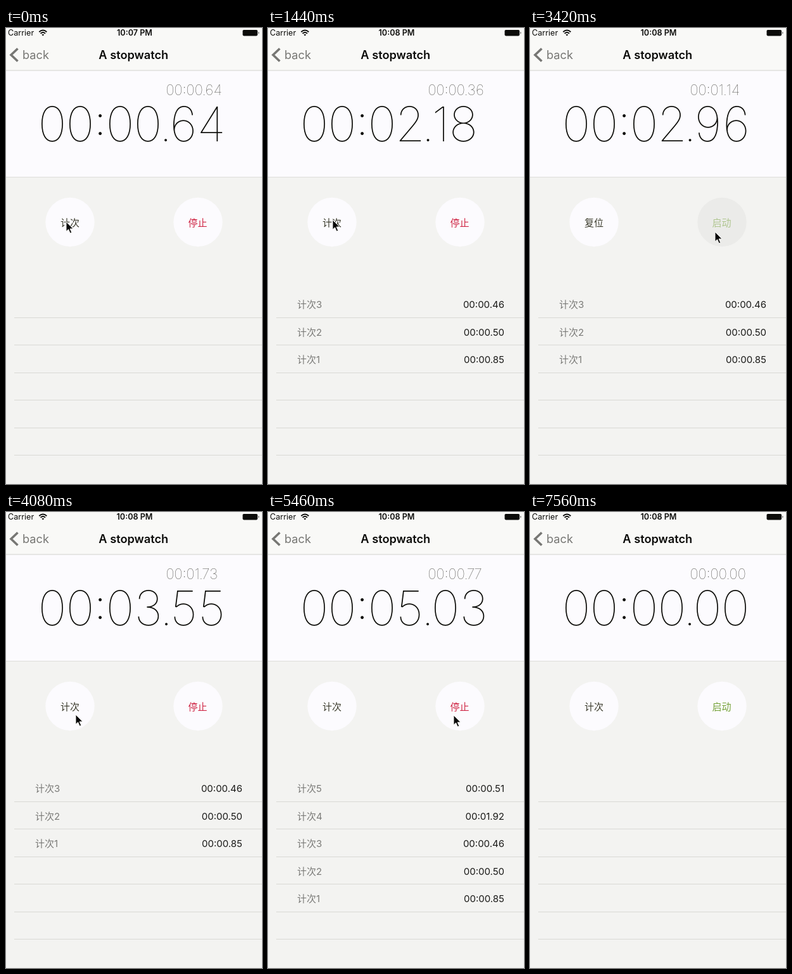
These frames come from a looping animation (404x720 px, 7620 ms). An HTML page:

```html
<!DOCTYPE html>
<html lang="en">
<head>
<meta charset="utf-8">
<title>A stopwatch</title>
<style>
  html, body { margin: 0; width: 100%; height: 100%; overflow: hidden; background: #f3f3f1; }
  svg { display: block; width: 404px; height: 720px; font-family: Inter, "Noto Sans CJK SC", "Noto Sans CJK", sans-serif; }
  .status { font-size: 12.6px; fill: #0c0c0a; }
  .bold { font-weight: 600; }
  .nav { font-size: 18.2px; }
  .thin { font-weight: 100; text-anchor: middle; }
  .button { font-size: 15px; text-anchor: middle; }
  .row { font-size: 15px; }
  .name { fill: #7b7b78; }
  .value { fill: #1a1a18; text-anchor: end; }
</style>
</head>
<body>
<svg viewBox="0 0 404 720">
  <rect width="404" height="720" fill="#f3f3f1"/>
  <rect width="404" height="67" fill="#f9f9f7"/>
  <rect y="67" width="404" height="168.5" fill="#fcfbfe"/>
  <path d="M0 67H404" stroke="#d2d2ce"/>
  <path d="M0 235.5H404" stroke="#dededa"/>

  <text class="status" x="3" y="12">Carrier</text>
  <g fill="none" stroke="#0c0c0a" stroke-width="1.9">
    <path d="M52.3 6.3Q58.3 .9 64.3 6.3M54.6 8.7Q58.3 5.4 62 8.7"/>
    <path d="M58.3 12.4L56.4 10.4Q58.3 8.9 60.2 10.4Z" fill="#0c0c0a" stroke="none"/>
  </g>
  <text id="clock" class="status bold" x="203" y="12" text-anchor="middle"></text>
  <rect x="373.5" y="3" width="23.5" height="9.4" rx="1.8" fill="#0c0c0a"/>
  <path d="M398.4 6Q400.4 7.7 398.4 9.4Z" fill="#0c0c0a"/>

  <path d="M18.5 32.5L8 42.5L18.5 52.5" fill="none" stroke="#777774" stroke-width="3.6"/>
  <text class="nav" x="26" y="49" fill="#777774">back</text>
  <text class="nav bold" x="201.3" y="49" text-anchor="middle" fill="#0c0c0a">A stopwatch</text>

  <text id="lap" class="thin" fill="#4c4c46"></text>
  <text id="total" class="thin" fill="#0c0c08"></text>

  <circle id="leftDisc" cx="101" cy="306.5" r="38.7"/>
  <text id="leftText" class="button" x="101" y="313"></text>
  <circle id="rightDisc" cx="303" cy="306.5" r="38.7"/>
  <text id="rightText" class="button" x="302.5" y="313"></text>

  <path id="lines" stroke="#d9d9d5"/>
  <g id="rows"></g>

  <path id="cursor" d="M0 0V15.2L3.6 11.9L6.2 18L8.7 16.9L6.1 11H11Z" fill="#080808" stroke="#fdfdfb" stroke-width=".9"/>
</svg>
<script>
const LOOP = 7620, STEP = 60;
const FIRST = 64, RATE = 0.10694;   // hundredths at the loop start and per ms
const STOP = 2169, RESUME = 3528, END = 5600, RESET = 6250;
const MINUTE_TURN = 720;

const ADVANCE = { 0: 44, 1: 28, 2: 44.5, 3: 45, 4: 44, 5: 44, 6: 44, 7: 38, 8: 44, 9: 45, ":": 19, ".": 12 };
const LAPS = [85, 50, 46, 192, 51];       // hundredths shown in the list
const MARKS = [85, 135, 182, 374, 426];   // running total at each lap

// time, x, y of the pointer tip
const POINTER = [
  [0, 95, 306], [1100, 95, 306], [1440, 102, 303], [2000, 292, 322], [3560, 292, 322],
  [4020, 110, 320], [4260, 110, 320], [4800, 107, 317], [4980, 107, 317],
  [5460, 293, 321], [5640, 293, 321], [6120, 97, 313], [6420, 97, 313], [6900, -20, 390]
];

const $ = id => document.getElementById(id);
const pad = n => String(n).padStart(2, "0");
const format = c => `${pad(Math.floor(c / 6000))}:${pad(Math.floor(c / 100) % 60)}.${pad(c % 100)}`;

function totalAt(t) {
  if (t >= RESET) return 0;
  const ran = Math.min(t, STOP) + Math.max(0, Math.min(t, END) - RESUME);
  return Math.round(FIRST + ran * RATE);
}

function timeOf(total) {
  const ran = (total - FIRST) / RATE;
  return ran <= STOP ? ran : ran + RESUME - STOP;
}

// A touch dims the button; after a lap the dimming lingers a moment.
const touched = (t, time, linger = 0) => t >= time - 110 && t < time + linger;
const LAP_TIMES = MARKS.map(timeOf);

function pointerAt(t) {
  const i = POINTER.findIndex(p => p[0] > t);
  if (i < 0) return null;
  const [t0, x0, y0] = POINTER[i - 1], [t1, x1, y1] = POINTER[i];
  const u = (t - t0) / (t1 - t0), e = u * u * (3 - 2 * u);
  return [x0 + (x1 - x0) * e, y0 + (y1 - y0) * e];
}

// Proportional thin digits with a raised colon.
function digits(id, text, x, baseline, scale) {
  const size = 76 * scale;
  $(id).innerHTML = [...text].map(ch => {
    const width = ADVANCE[ch] * scale, mid = x + width / 2, colon = ch === ":";
    x += width;
    const y = baseline - (colon ? 10 * scale : 0);
    const style = colon ? `font-size:${size * 0.82}px;font-weight:200` : `font-size:${size}px`;
    return `<tspan x="${mid}" y="${y}" style="${style}">${ch}</tspan>`;
  }).join("");
}

function button(side, label, color, pressed) {
  $(side + "Disc").setAttribute("fill", pressed ? "#ebebe9" : "#fcfbfe");
  const text = $(side + "Text");
  text.textContent = label;
  text.setAttribute("fill", color);
  text.setAttribute("opacity", pressed ? 0.5 : 1);
}

function draw(t) {
  const total = totalAt(t);
  const running = t < STOP || (t >= RESUME && t < END);
  const count = MARKS.filter(m => m <= total).length;

  $("clock").textContent = t < MINUTE_TURN ? "10:07 PM" : "10:08 PM";
  digits("total", format(total), 51, 179.3, 1);
  digits("lap", format(total - (count ? MARKS[count - 1] : 0)), 252.3, 105.6, 0.3);

  const leftPressed = touched(t, RESET) || LAP_TIMES.some(time => touched(t, time, 90));
  const rightPressed = [STOP, RESUME, END].some(time => touched(t, time));
  button("left", !running && total ? "复位" : "计次", "#3b3b2c", leftPressed);
  button("right", running ? "停止" : "启动", running ? "#cf2544" : "#76a23a", rightPressed);

  $("rows").innerHTML = LAPS.slice(0, count).reverse().map((lap, i) => {
    const y = 442 + i * 43.5;
    return `<text class="row name" x="46" y="${y}">计次${count - i}</text>` +
      `<text class="row value" x="373" y="${y}">${format(lap)}</text>`;
  }).join("");

  const tip = pointerAt(t);
  $("cursor").setAttribute("visibility", tip ? "visible" : "hidden");
  if (tip) $("cursor").setAttribute("transform", `translate(${tip[0]} ${tip[1]})`);
}

$("lines").setAttribute("d", Array.from({ length: 6 }, (_, i) => `M13 ${Math.floor(457 + i * 43.5) + 0.5}H404`).join(""));

const start = performance.now();
let shown = -1;
function tick() {
  const t = Math.floor(((performance.now() - start) % LOOP) / STEP) * STEP;
  if (t !== shown) draw(shown = t);
  requestAnimationFrame(tick);
}
tick();
</script>
</body>
</html>
```
